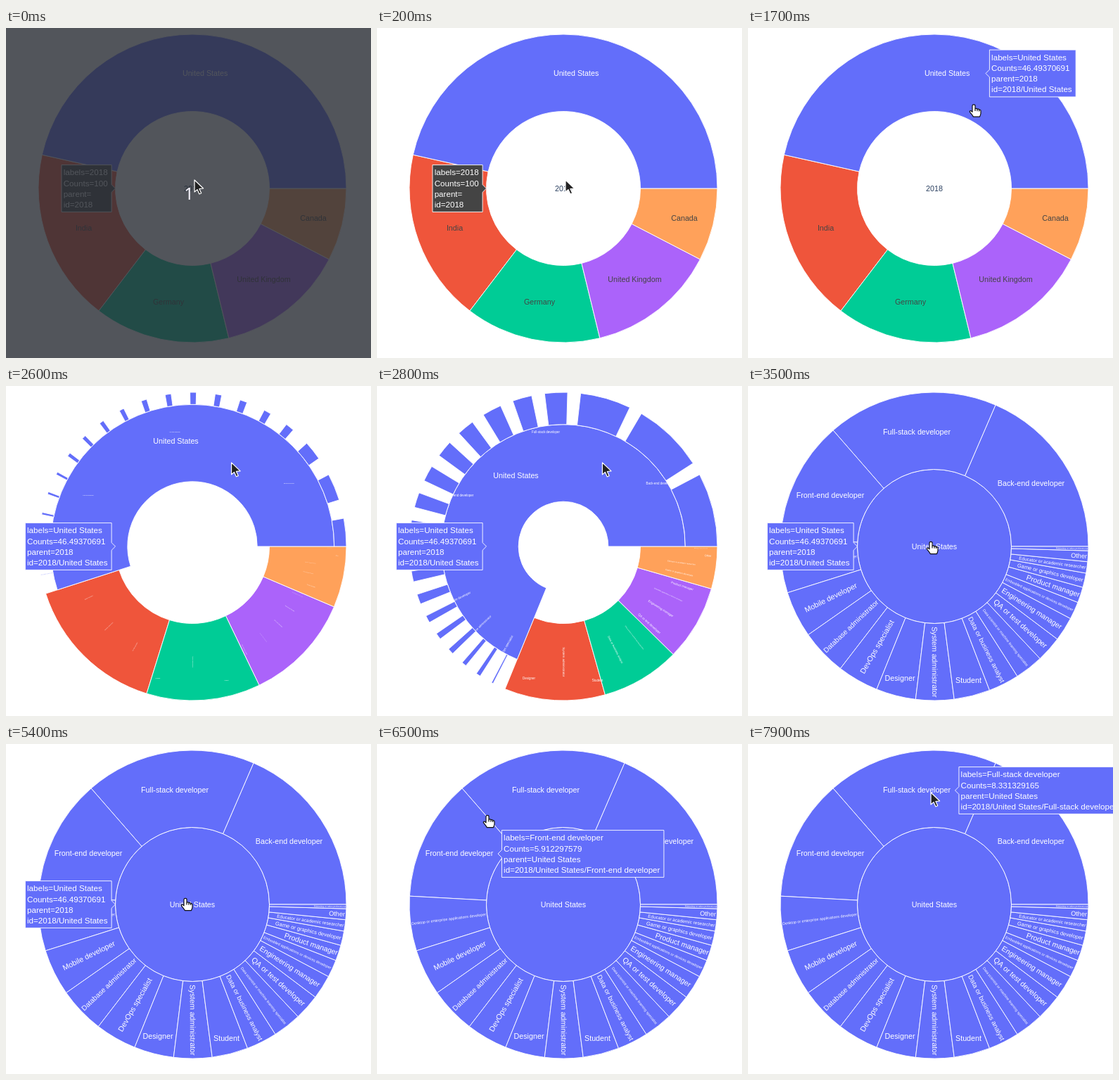
An HTML page with a canvas that plays this animation: 519x469 px, repeating every 8 s.

```html
<!DOCTYPE html>
<html lang="en">
<head>
<meta charset="utf-8">
<title>Sunburst drill-down</title>
<style>
  html, body { margin: 0; width: 100%; height: 100%; overflow: hidden; background: #fff; }
  canvas { display: block; }
</style>
</head>
<body>
<canvas id="stage" width="519" height="469"></canvas>
<script>
const ctx = document.getElementById('stage').getContext('2d');
const LOOP = 8000, STEP = 100;
const CX = 265, CY = 228, R = 219, HOLE = R / 2;
const FONT = '"Liberation Sans", Arial, sans-serif';
const LABEL = 10.72, TIP = 11.62, LINE = 15.1;
const BLUE = '#636efa', DARK = '#444';
const US_END = 167.4;
const ZOOM_START = 2478, ZOOM_TIME = 772;

// name, end angle, colour, label x, label y
const countries = [
  ['India', 232.6, '#ef553b', 110.5, 284.5],
  ['Germany', 283.7, '#00cc96', 231, 389.5],
  ['United Kingdom', 332.6, '#ab63fa', 366.5, 357.5],
  ['Canada', 360, '#ffa15a', 437, 270.5],
];

// name, end angle, font size, then x and y of a level label or the radius of a radial one
const roles = [
  ['Back-end developer', 66.6, LABEL, 402.5, 138.5],
  ['Full-stack developer', 131.1, LABEL, 240, 65.5],
  ['Front-end developer', 176.9, LABEL, 117, 155.5],
  ['Desktop or enterprise applications developer', 197.5, 5.4],
  ['Mobile developer', 215, LABEL],
  ['Database administrator', 232.4, 10],
  ['DevOps specialist', 248, LABEL],
  ['Designer', 263, LABEL, 216, 415.5],
  ['System administrator', 277.4, LABEL],
  ['Student', 291, LABEL, 313.5, 418.5],
  ['Data or business analyst', 302.6, 9.45],
  ['Data scientist or machine learning specialist', 313.3, 5.2],
  ['QA or test developer', 323, LABEL],
  ['Engineering manager', 332.1, 10.4],
  ['Embedded applications or devices developer', 338.7, 5.3],
  ['Product manager', 344.6, 10.4, 178],
  ['Game or graphics developer', 350, 7.6, 169],
  ['Educator or academic researcher', 354.3, 6.5, 169.5],
  ['Other', 358.4, 9.2, 206],
  ['Marketing or sales professional', 360, 3.3, 195.5],
];

// time, x, y of the pointer's hot spot
const pointerPath = [
  [0, 268, 216], [1200, 268, 216], [1300, 270, 212], [1400, 281, 190], [1500, 297, 158],
  [1600, 312, 128], [1700, 321, 108.5], [3100, 320.3, 109], [3200, 308, 132], [3300, 286, 177],
  [3400, 270, 205], [3500, 260, 221], [5300, 260, 221], [5400, 255, 219], [5500, 228, 206],
  [5600, 192, 189], [5700, 166, 176], [5800, 166, 176], [6000, 130, 138], [6300, 130, 138],
  [6400, 138, 126], [6500, 157, 101], [6600, 172, 86], [6700, 180, 81], [7100, 180, 81],
  [7200, 190, 80], [7300, 215, 76], [7400, 244, 71], [7500, 260, 69], [LOOP, 260, 69],
];

const usLines = ['labels=United States', 'Counts=46.49370691', 'parent=2018', 'id=2018/United States'];
const roleLines = (name, count) =>
  [`labels=${name}`, `Counts=${count}`, 'parent=United States', `id=2018/United States/${name}`];

// start time, anchor x, anchor y, side, colour, lines
const tooltips = [
  [0, 155.5, 228, -1, DARK, ['labels=2018', 'Counts=100', 'parent=', 'id=2018']],
  [1600, 338, 64.5, 1, BLUE, usLines],
  [2500, 155.5, 228, -1, BLUE, usLines],
  [5700, 172, 156, 1, BLUE, roleLines('Front-end developer', '5.912297579')],
  [6600, 294.5, 66, 1, BLUE, roleLines('Full-stack developer', '8.331329165')],
];

const arrowShape = new Path2D('M0 0V17L4 13.6L6.9 20L9.7 18.8L6.9 12.6L12.6 12Z');
const handShape = new Path2D('M-2 2Q-2 .4 0 .4T2 2V6.2Q4.2 5.4 5 6.8Q7 6.2 7.6 7.7Q10 7.3 10 9.4V13' +
  'Q9.6 15.5 8.4 17.6H-.6Q-2 15-5.6 10.8Q-6 9-4.2 9L-2 10.8Z');
const handLines = new Path2D('M2 6.2V9.6M5 6.8V9.8M7.6 7.7V10');

const lerp = (a, b, p) => a + (b - a) * p;
const clamp = v => Math.min(1, Math.max(0, v));
const rad = deg => deg * Math.PI / 180;
const polar = (deg, r) => [CX + r * Math.cos(rad(deg)), CY - r * Math.sin(rad(deg))];

function text(str, x, y, size, color, angle = 0) {
  if (size < 0.05) return;
  ctx.save();
  ctx.translate(x, y);
  ctx.rotate(angle);
  ctx.scale(size / LABEL, size / LABEL);
  ctx.font = `${LABEL}px ${FONT}`;
  ctx.textAlign = 'center';
  ctx.fillStyle = color;
  ctx.fillText(str, 0, LABEL * 0.355);
  ctx.restore();
}

function sector(a0, a1, r0, r1, color) {
  if (a1 - a0 < 0.01 || r1 - r0 < 0.01) return;
  ctx.beginPath();
  if (a1 - a0 > 359.9) {
    ctx.arc(CX, CY, r1, 0, 2 * Math.PI);
  } else {
    ctx.arc(CX, CY, r1, -rad(a0), -rad(a1), true);
    ctx.arc(CX, CY, r0, -rad(a1), -rad(a0));
    ctx.closePath();
  }
  ctx.fillStyle = color;
  ctx.fill();
  ctx.strokeStyle = '#fff';
  ctx.lineWidth = 0.9;
  ctx.stroke();
}

function drawCountries(p) {
  let start = US_END;
  for (const [name, end, color, x, y] of countries) {
    sector(lerp(start, 360, p), lerp(end, 360, p), HOLE, R, color);
    if (p === 0) text(name, x, y, LABEL, DARK);
    start = end;
  }
  if (p === 0) text('2018', CX, CY, LABEL, '#2a3f5f');
}

function drawHome(p) {
  const end = lerp(US_END, 360, p);
  const outer = lerp(R, HOLE, p);
  sector(0, end, lerp(HOLE, 0, p), outer, BLUE);
  const [x, y] = polar(end / 2, outer * 0.753 * (1 - p ** 3));
  text('United States', x, y, LABEL, '#fff');
}

function drawRoles(p) {
  let start = 0;
  roles.forEach(([name, end, size, a = 164.25, b], i) => {
    const seed = US_END * i / roles.length;
    sector(lerp(seed, start, p), lerp(seed, end, p), lerp(R, HOLE, p), R, BLUE);
    if (b !== undefined) {
      text(name, a, b, size * p, '#fff');
    } else {
      const mid = (start + end) / 2;
      const turn = mid > 90 && mid < 270 ? 180 - mid : -mid;
      text(name, ...polar(mid, a), size * p, '#fff', rad(turn));
    }
    start = end;
  });
}

function drawTooltip(t) {
  const [, x, y, side, color, lines] = tooltips.filter(tip => tip[0] <= t).pop();
  ctx.font = `${TIP}px ${FONT}`;
  const width = Math.max(...lines.map(l => ctx.measureText(l).width)) + 8.2;
  const near = x + side * 5.4, far = near + side * width, half = 33.4;
  ctx.beginPath();
  ctx.moveTo(x, y);
  for (const [px, py] of [[near, -5.4], [near, -half], [far, -half], [far, half], [near, half], [near, 5.4]]) {
    ctx.lineTo(px, y + py);
  }
  ctx.closePath();
  ctx.fillStyle = color;
  ctx.fill();
  ctx.strokeStyle = '#fff';
  ctx.lineWidth = 0.9;
  ctx.stroke();
  ctx.fillStyle = '#fff';
  ctx.textAlign = 'left';
  lines.forEach((l, i) => ctx.fillText(l, Math.min(near, far) + 2.7, y + (i - 1.5) * LINE + 4.1));
}

function drawPointer(t) {
  const next = pointerPath.findIndex(k => k[0] > t);
  const [t0, x0, y0] = pointerPath[next - 1], [t1, x1, y1] = pointerPath[next];
  const p = (t - t0) / (t1 - t0);
  const hand = (t >= 1600 && t < 2500) || (t >= 3400 && t < 7900);
  ctx.save();
  ctx.translate(lerp(x0, x1, p), lerp(y0, y1, p));
  ctx.lineJoin = 'round';
  ctx.lineWidth = 1.2;
  ctx.fillStyle = hand ? '#fff' : '#222';
  ctx.strokeStyle = hand ? '#111' : '#fff';
  ctx.fill(hand ? handShape : arrowShape);
  ctx.stroke(hand ? handShape : arrowShape);
  if (hand) ctx.stroke(handLines);
  ctx.restore();
}

function drawCountdown(t) {
  if (t >= 200) return;
  ctx.fillStyle = `rgba(43, 46, 54, ${t < 100 ? 0.81 : 0.35})`;
  ctx.fillRect(0, 0, 519, 469);
  if (t >= 100) return;
  ctx.font = '500 24px "Noto Sans", sans-serif';
  ctx.textAlign = 'center';
  ctx.fillStyle = '#f4f2fa';
  ctx.fillText('1', 260, 243.5);
}

function draw(now) {
  const t = Math.floor(now % LOOP / STEP) * STEP;
  const p = clamp((t - ZOOM_START) / ZOOM_TIME);
  ctx.fillStyle = '#fff';
  ctx.fillRect(0, 0, 519, 469);
  if (p < 1) drawCountries(p);
  drawHome(p);
  if (p > 0) drawRoles(p);
  drawTooltip(t);
  drawCountdown(t);
  drawPointer(t);
}

let origin;
function tick(now) {
  origin ??= now;
  draw(now - origin);
  requestAnimationFrame(tick);
}
draw(0);
requestAnimationFrame(tick);
</script>
</body>
</html>
```
